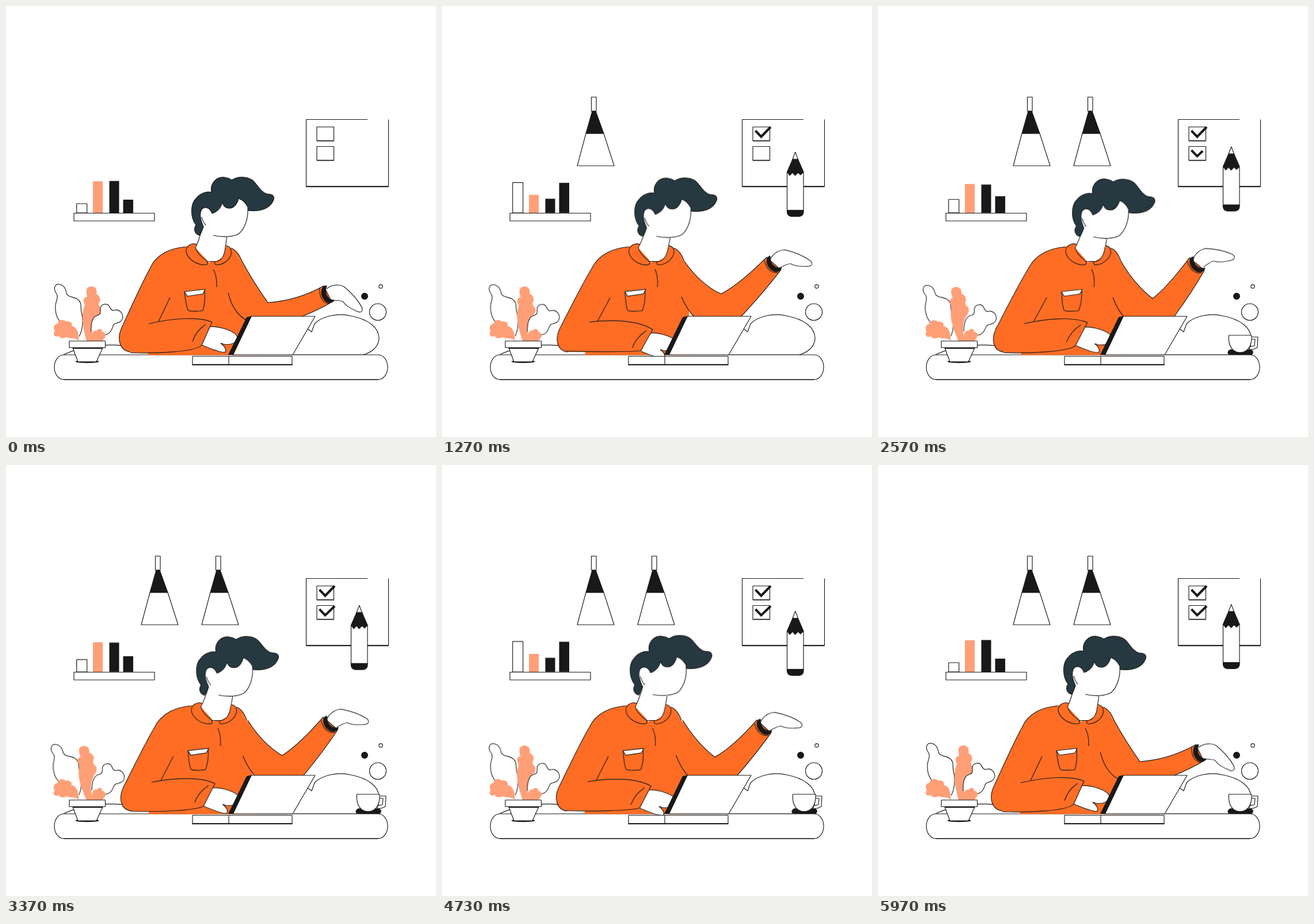
Write an HTML page without scripts that moves like this. It is 747 px wide and 750 px high and loops after 6.01 s.

```html
<!DOCTYPE html>
<html lang="en">
<head>
<meta charset="utf-8">
<title>Working at a desk</title>
<style>
html, body { margin: 0; width: 100%; height: 100%; overflow: hidden; background: #fff; }
svg { display: block; width: 100vw; height: 100vh; }

.o { fill: #ff6d24; }
.p { fill: #ff9f78; }
.k { fill: #191919; }
.w { fill: #fff; }
.n { fill: none; }
.h { fill: #263840; }
.l { stroke: #191919; stroke-width: 1.15; stroke-linejoin: round; }
.b { stroke: #191919; stroke-width: 2; }

.m { animation: 6010ms ease-in-out infinite; }

/* Periodic parts */
.bar, .bob { animation: grow 1502.5ms cubic-bezier(.37,0,.63,1) infinite alternate; }
.bar { transform-origin: 0 360px; vector-effect: non-scaling-stroke; }
.bob { animation-name: bob; }
.sway { animation: sway 3005ms cubic-bezier(.37,0,.63,1) infinite alternate; }
@keyframes grow { to { transform: scaleY(var(--s)); } }
@keyframes bob { to { transform: translateY(12.5px); } }
@keyframes sway { to { transform: rotate(var(--a)); } }

/* Arrivals */
.lamp1 { animation-name: lamp1; transform-origin: 264px 158px; }
.lamp2 { animation-name: lamp2; transform-origin: 264px 158px; }
.pencil { animation-name: pencil; transform-origin: 614px 300px; }
.cup { animation-name: cup; transform-origin: 630px 606px; }
.tick { fill: none; stroke: #191919; stroke-width: 4; stroke-dasharray: 1 2; animation-timing-function: linear; }
.tick1 { animation-name: tick1; }
.tick2 { animation-name: tick2; }
@keyframes lamp1 {
  0%, 8% { transform: scale(0); animation-timing-function: linear; }
  12.8% { transform: scale(.92); animation-timing-function: ease-out; }
  15.3% { transform: scale(1.08); }
  20%, 100% { transform: none; }
}
@keyframes lamp2 {
  0%, 22.3% { transform: scale(0); animation-timing-function: linear; }
  26.9% { transform: scale(.92); animation-timing-function: ease-out; }
  29.2% { transform: scale(1.075); }
  34%, 100% { transform: none; }
}
@keyframes pencil { 0%, 5% { transform: scale(0); } 10%, 100% { transform: none; } }
@keyframes cup { 0%, 23.5% { transform: scale(0); } 28%, 100% { transform: none; } }
@keyframes tick1 { 0%, 6.5% { stroke-dashoffset: 1; } 13.5%, 100% { stroke-dashoffset: 0; } }
@keyframes tick2 { 0%, 37.8% { stroke-dashoffset: 1; } 44.5%, 100% { stroke-dashoffset: 0; } }

/* Body */
.torso { animation-name: lean; transform-origin: 0 640px; }
@keyframes lean {
  0%, 100% { transform: skewX(0deg); }
  12.8% { transform: skewX(-3.55deg); }
  28.8% { transform: skewX(-2.75deg); }
  42.8% { transform: skewX(-3.5deg); }
  68.7% { transform: skewX(-1.5deg); }
  89.4% { transform: skewX(-2.05deg); }
}
.head { animation-name: nod; transform-origin: 390px 350px; }
@keyframes nod {
  0%, 100% { transform: translate(0, 0) rotate(0deg); }
  12.8% { transform: translate(16px, 2.8px) rotate(0deg); }
  28.8% { transform: translate(9px, .2px) rotate(-.6deg); }
  42.8% { transform: translate(15.3px, 3.2px) rotate(1.2deg); }
  68.7% { transform: translate(1.8px, -1.4px) rotate(-3deg); }
  89.4% { transform: translate(6.5px, .3px) rotate(-1deg); }
}

/* Typing arm */
.sleeve { animation-name: sleeve; }
.type { animation-name: type; }
@keyframes sleeve {
  0%, 48%, 95%, 100% { d: path("M248 553C290 543 335 540 358 550L340 590C330 602 260 605 216 603.5"); }
  13%, 20%, 68% { d: path("M251 550C295 545 335 547 362 563L343 600C320 602 260 602 214 600.5"); }
}
@keyframes type {
  0%, 48%, 95%, 100% { transform: translate(0, 0); }
  13%, 20%, 68% { transform: translate(4px, 11px); }
}

/* Gesturing arm */
.arm { animation-name: arm; }
.cuff { animation-name: cuff; transform-origin: 559px 501px; }
.hand { animation-name: hand; transform-origin: 559px 501px; }
@keyframes arm {
  0%, 100% { d: path("M410 444Q430 481 455 516Q505 513 552 487L566 515Q545 528 510 542C450 565 400 560 386 499"); }
  12.8% { d: path("M422 444Q444 480 472 514Q495 497 534 446L561 467Q542 500 512 540C480 575 425 570 405 506"); }
  20%, 33% { d: path("M421 444Q450 485 485 501Q521 481 564 437L589 459Q561 496 520 540C492 575 444 570 416 506"); }
  28.8%, 64%, 68.7% { d: path("M419 444Q447 487 481 504Q515 483 555 439L580 461Q555 497 518 540C490 575 440 570 413 506"); }
  42.8% { d: path("M422 444Q445 484 477 509Q502 490 541 438L567 460Q546 497 515 540C485 575 430 570 408 507"); }
  89.4% { d: path("M417 444Q439 482 466 513Q495 500 538 449L562 472Q543 499 508 540C480 575 420 570 399 504"); }
}
@keyframes cuff {
  0%, 100% { transform: translate(0, 0) rotate(0deg); }
  12.8% { transform: translate(-11.5px, -44.5px) rotate(-20deg); }
  20%, 33% { transform: translate(17.5px, -53px) rotate(-17deg); }
  28.8%, 64%, 68.7% { transform: translate(8.5px, -51px) rotate(-17deg); }
  42.8% { transform: translate(-5px, -52px) rotate(-19deg); }
  89.4% { transform: translate(-9px, -40.5px) rotate(-18deg); }
}
@keyframes hand {
  0%, 100% { transform: rotate(0deg); }
  12.8%, 42.8% { transform: rotate(-18deg); }
  20%, 28.8%, 33%, 64%, 68.7% { transform: rotate(-9deg); }
  89.4% { transform: rotate(-13deg); }
}
</style>
</head>
<body>
<svg viewBox="0 0 747 750">
  <defs>
    <g id="lamp" class="l">
      <path class="w" d="M259.5 158.5h8.5v24.5h-8.5z"/>
      <path class="k" d="M261 183h6L281 222H250z"/>
      <path class="w" d="M250 222h31L299 278H235z"/>
    </g>
  </defs>

  <!-- Board -->
  <g class="n l">
    <path d="M628 197.5H521.5V314H664.5V197.5"/>
    <path class="b" d="M521.5 314.2H664.5"/>
    <path d="M540 210.5h29.5v24H540zM540 244.5h29.5v24H540z"/>
    <path stroke-width="1.8" d="M540 234.6h30M540 268.6h30"/>
  </g>
  <path class="m tick tick1" pathLength="1" d="M544.5 217L554.5 227.5L571 210.5"/>
  <path class="m tick tick2" pathLength="1" d="M544.5 251L554.5 261.5L571 245.5"/>
  <g class="m pencil"><g class="bob l">
    <path class="w" d="M599.5 277h28.5v67h-28.5z"/>
    <path class="w" d="M609 255L613.7 242.5L618.5 255z"/>
    <path class="k" d="M609 255h9.5L628 277l-5 5-4.5-4-5 5-4.5-5-5 5-4.5-6z"/>
    <path class="k" d="M599.5 343.5h28.5v4q-1 6.5-8 7h-12.5q-7-.5-8-7z"/>
  </g></g>

  <!-- Lamps -->
  <g class="m lamp1"><use href="#lamp"/></g>
  <g transform="translate(105)"><g class="m lamp2"><use href="#lamp"/></g></g>

  <!-- Shelf -->
  <path class="w l" d="M118 360.5h140v13.5h-140z"/>
  <rect class="bar w l" style="--s:3.44" x="122.7" y="344" width="18" height="16"/>
  <rect class="bar p" style="--s:.545" x="151" y="305" width="17" height="55"/>
  <rect class="bar k" style="--s:.41" x="179.5" y="304.5" width="17" height="55.5"/>
  <rect class="bar k" style="--s:2.35" x="203.5" y="337" width="17.5" height="23"/>

  <!-- Bubbles and mound -->
  <circle class="w l" cx="651" cy="488" r="3.2"/>
  <circle class="k" cx="623" cy="505" r="6"/>
  <circle class="w l" cx="646" cy="532.5" r="14.5"/>
  <path class="w l" d="M524 562L531 567L536 553C548 540 575 534 598 539C630 545 648 560 648 578C648 592 636 603 620 607H500"/>
  <path class="w l" d="M100 607C125 594 190 580 246 600"/>

  <!-- Desk -->
  <rect class="w l" x="84" y="607" width="579" height="43" rx="16" ry="21.5"/>
  <path class="l" d="M100 650.3H647"/>
  <g class="m cup l">
    <path class="k" d="M612 598h36q6 4 1 8.5h-39q-5-4 2-8.5z"/>
    <path class="w" d="M648 576h12l-1 18q-5 4-14 4z"/>
    <path class="w" d="M648 580h7l-1 11-7 2z"/>
    <path class="w" d="M609.5 573H649C650 592 642 603 629 603C616 603 608 592 609.5 573z"/>
  </g>

  <!-- Plant -->
  <path class="sway w l" style="--a:-4deg;transform-origin:118px 582px" d="M97 552C88 545 85 535 86 520C88 510 92 505 86 498C82 490 86 484 91 484C100 485 104 492 105 500C108 508 118 505 125 511C133 517 129 525 131 533C135 545 133 565 127 575"/>
  <path class="sway p" style="--a:-9deg;transform-origin:148px 582px" d="M140 583C131 550 131 535 137 520C133 512 134 508 141 506C138 495 140 488 148 488C156 488 159 494 157 501C161 503 165 508 163 514C160 518 161 522 165 526C167 532 163 538 160 540C153 550 148 560 151 583z"/>
  <path class="sway w l" style="--a:4deg;transform-origin:160px 582px" d="M148 567C147 550 150 540 160 538C166 536 163 530 164 525C166 518 176 517 179 522C183 529 184 531 190 529C197 528 203 534 203 542C201 551 194 551 189 553C184 556 186 562 181 567C178 571 173 572 170 572"/>
  <path class="p" d="M150 583C147 570 152 563 158 565C160 560 168 562 167 567C174 568 175 575 170 579L168 583z"/>
  <path class="sway p" style="--a:-1deg;transform-origin:126px 582px" d="M126 583C122 576 110 580 106 576C98 580 92 577 92 574C84 578 80 570 85 566C80 558 86 552 90 553C90 546 100 544 104 549C112 548 116 552 114 557C122 558 127 566 126 583z"/>
  <ellipse class="k" cx="141" cy="618.8" rx="20.5" ry="2.5"/>
  <path class="w l" d="M116 595H168L157 619H125z"/>
  <path class="w l" d="M110 583h62.5v11.5H110z"/>
  <path class="b" d="M116 595.5H168"/>

  <!-- Person -->
  <g class="m torso">
    <path class="o" d="M331 414C322 411 318 417 313 419C287 421 261 431 250 457C236 482 216 527 200 562C193 579 197 600 216 602L247 602L246 607.5H429L425 545L411 446L392 421L352 447z"/>
    <path class="n l" d="M313 419C287 421 261 431 250 457C236 482 216 527 200 562C193 579 197 600 216 602M285 507L265 549"/>
    <path class="o l" d="M391 421C401 425 406 435 410 444"/>
  </g>
  <path class="m arm o l"/>
  <g class="m cuff">
    <path class="m hand w l" d="M557 492C566 484 580 484 588 489C600 499 612 513 618 524C621 531 617 535 609 531C596 525 590 521 585 514C579 512 572 512 565 512"/>
    <path class="k l" d="M557 487C548 486 545 500 552 510C557 518 566 518 570 512C562 512 551 503 557 487z"/>
    <path class="n l" d="M545 491C544 506 550 517 562 518"/>
  </g>
  <g class="m torso">
    <path class="w" d="M347 376L329 421L352 445H363L380 436L384 400z"/>
    <path class="n l" d="M341 385C338 398 334 410 329 421M383.5 402C383 409 382 414 381 420M350 444.5H364"/>
    <path class="o l" d="M331 415C322 411 312 418 313 428C316 441 332 451 346 450.5C351 450 352 447 348 443C339 437 331 428 329 420"/>
    <path class="o l" d="M382 417C391 418 393 427 390 435C385 446 372 452 364 450C361 447 362 445 366 444.5C377 442 380 431 381 420"/>
    <path class="n l" d="M360 458C365 467 366.5 478 366 489"/>
    <path class="n l" d="M310 497C312 512 313 525 317 530C322 532 338 531 342 530C346 518 346 505 345 494"/>
    <path class="w l" d="M310 497L346 493L342 501L315 505z"/>
    <path class="m type w l" d="M352 558C372 557 400 566 402 577C402 584 394 589 384 589C378 590 374 586 373 587C380 592 383 597 381 602C376 605 352 595 340 590"/>
    <path class="m sleeve o l"/>
    <path class="m type n l" d="M347 554Q330 565 324 584"/>
  </g>
  <g class="m head">
    <path class="w" d="M345 345L338 360L347 384L360 399C385 406 408 398 416 378C421 365 421 352 418 343L404 333z"/>
    <path class="n l" d="M360 399C375 403 395 402 405 396C416 386 421 368 420 352"/>
    <path class="h l" d="M336 399C328 397 325 388 330 381C320 368 320 345 330 335C338 324 350 323 357 324C354 308 366 297 379 298C385 299 390 301 392 303C404 295 424 296 433 308C440 317 445 325 454 327C462 327 467 330 465 337C460 350 446 358 421 356L420 350C416 342 410 337 404 335C402 345 395 352 388 352C380 352 377 347 376 341C374 350 368 358 358 361C354 350 345 348 340 354C335 362 339 375 343 384C341 390 339 396 336 399z"/>
    <path class="n l" d="M340 367Q342 376 347 381.5"/>
  </g>

  <!-- Laptop -->
  <path class="w l" d="M324 609.5H497V624H324zM387 609.5V624"/>
  <path class="b" d="M323.5 624.3H497.5"/>
  <path class="w l" d="M426 540H537L498 607H394z"/>
  <path class="k" d="M418 541.5L427 539.5L395 607H386z"/>
</svg>
</body>
</html>
```
